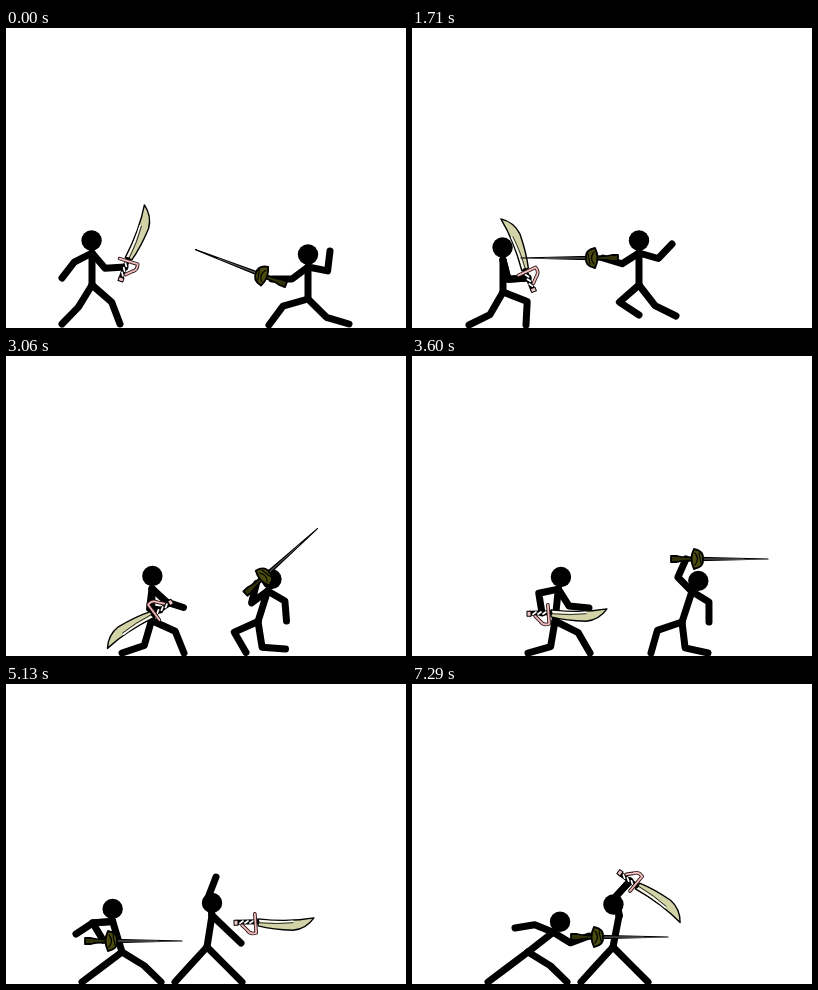
Write an HTML page with a canvas that moves like this. It is 400 px wide and 300 px high and loops after 8000 ms.

```html
<!DOCTYPE html>
<html lang="en">
<head>
<meta charset="utf-8">
<title>Stick figure duel</title>
<style>
  html, body { margin: 0; height: 100%; overflow: hidden; background: #fff; }
  canvas { display: block; }
</style>
</head>
<body>
<canvas id="stage" width="400" height="300"></canvas>
<script>
const ctx = document.getElementById('stage').getContext('2d');
const LOOP = 8000, STEP = 90;
const TORSO = 32, NECK = 12.5, ARM = 20, THIGH = 26, SHIN = 23.5;

// A pose keeps whatever it does not change from the one before.
// spine: torso and head angle; arms: hand x, y and elbow side, sword hand first;
// fly: distance of the sword from its hand; leap, toss: height of the arc on the way here.
const chain = poses => poses.reduce((all, pose) =>
  [...all, { fly: [0, 0], flip: 1, ...all.at(-1), leap: 0, toss: 0, ...pose }], []);

const fencer = chain([
  { at: 0, face: 1, hip: [86, 257], spine: [-90, -92], sword: -70,
    arms: [[119, 239, 1], [56, 250, 1]], feet: [[56, 296], [114, 296]] },
  { at: 4, hip: [87, 259] },
  { at: 14 },
  { at: 19, hip: [91, 264], sword: -112,
    arms: [[116, 250, 1], [116, 250, 1]], feet: [[57, 297], [114, 297]] },
  { at: 28, hip: [148, 264], spine: [-94, -99], sword: -66,
    arms: [[178, 251, 0], [178, 251, 0]], feet: [[116, 297], [178, 297]] },
  { at: 40, hip: [143, 265], spine: [-84, -78], sword: -361,
    arms: [[130, 257, 1], [177, 252, 1]] },
  { at: 49, face: 0, hip: [201, 263], spine: [-92, -94], sword: -329,
    arms: [[177, 261, 1], [232, 251, 0]], feet: [[169, 298], [236, 298]] },
  { at: 57, spine: [-81, -90], sword: -361, fly: [33, 45],
    arms: [[210, 193, -1], [235, 259, 0]] },
  { at: 67, spine: [-79, -117], sword: -683, fly: [0, 0], flip: -1, toss: 25,
    arms: [[218, 197, -1], [218, 197, -1]] }
]);

const rival = chain([
  { at: 0, face: -1, hip: [302, 271], spine: [-90, -90], sword: 201,
    arms: [[266, 251, -1], [324, 223, 1]], feet: [[263, 297], [343, 296]] },
  { at: 4, hip: [301, 273] },
  { at: 14 },
  { at: 19, hip: [227, 257], sword: 180,
    arms: [[191, 230, -1], [260, 216, 1]], feet: [[227, 287], [264, 288]] },
  { at: 28, hip: [234, 265], spine: [-73, -85], sword: 276,
    arms: [[227, 252, -1], [264, 264, -1]], feet: [[241, 296], [263, 289]] },
  { at: 40, hip: [270, 266], spine: [-72, -59], sword: 360,
    arms: [[274, 203, -1], [297, 266, -1]], feet: [[239, 297], [296, 297]] },
  { at: 49, face: 1, leap: 80, hip: [122, 265], spine: [-87, -65], sword: 17, fly: [-2, -41],
    arms: [[93, 214, -1], [165, 236, 1]], feet: [[85, 298], [155, 298]] },
  { at: 57, hip: [116, 268], spine: [-107, -90], sword: 0, fly: [-3, 1], toss: 110,
    arms: [[97, 256, 1], [70, 250, 1]], feet: [[76, 298], [155, 298]] },
  { at: 67, spine: [-38, -57], arms: [[177, 252, 1], [103, 244, 1]] }
]);

const rad = deg => deg * Math.PI / 180;

// Blends numbers, arrays and objects alike.
function mix(a, b, k) {
  if (typeof a === 'number') return a + (b - a) * k;
  if (Array.isArray(a)) return a.map((v, i) => mix(v, b[i], k));
  return Object.fromEntries(Object.keys(a).map(key => [key, mix(a[key], b[key], k)]));
}

function poseAt(poses, tick) {
  const last = poses.at(-1);
  if (tick >= last.at) return { ...last, leap: 0, toss: 0 };
  const i = poses.findIndex(p => p.at > tick);
  const a = poses[i - 1], b = poses[i];
  const k = (tick - a.at) / (b.at - a.at), arc = Math.sin(Math.PI * k);
  return { ...mix(a, b, k), leap: b.leap * arc, toss: b.toss * arc };
}

const reach = ([x, y], angle, len) => [x + len * Math.cos(angle), y + len * Math.sin(angle)];

function polyline(...pts) {
  ctx.beginPath();
  pts.forEach(p => ctx.lineTo(...p));
  ctx.stroke();
}

// Two bones from root to end; side tells which way the joint bends.
function limb(root, end, l1, l2, side) {
  const dx = end[0] - root[0], dy = end[1] - root[1];
  const d = Math.min(Math.hypot(dx, dy), l1 + l2);
  const bend = Math.acos(Math.min(1, (l1 * l1 + d * d - l2 * l2) / (2 * l1 * d)));
  polyline(root, reach(root, Math.atan2(dy, dx) + bend * side, l1), end);
}

function drawBody({ hip, spine, arms, feet, face, leap }, nod = 0) {
  const neck = reach(hip, rad(spine[0]), TORSO);
  ctx.save();
  ctx.translate(0, -leap);
  ctx.strokeStyle = ctx.fillStyle = '#000';
  ctx.lineWidth = 7;
  polyline(hip, neck);
  for (const [x, y, side] of arms) limb(neck, [x, y], ARM, ARM, side);
  for (const foot of feet) limb(hip, foot, THIGH, SHIN, -face);
  ctx.beginPath();
  ctx.arc(...reach(neck, rad(spine[1] + nod), NECK), 10.2, 0, 7);
  ctx.fill();
  ctx.restore();
}

function drawSword({ arms: [[x, y]], fly, sword, flip, leap, toss }, paint) {
  ctx.save();
  ctx.translate(x + fly[0], y + fly[1] - leap - toss);
  ctx.rotate(rad(sword));
  ctx.scale(1, flip);
  paint();
  ctx.restore();
}

function shape(path, fill, stroke, width = 1) {
  const p = new Path2D(path);
  if (fill) { ctx.fillStyle = fill; ctx.fill(p); }
  if (stroke) { ctx.strokeStyle = stroke; ctx.lineWidth = width; ctx.stroke(p); }
}

function cutlass() {
  shape('M9-3Q40 1 65-3Q57 8 44 9Q24 8 9 4Z', '#d3d3a8', '#000', 1.4);
  shape('M10-1Q28 1 44 0', null, '#fff', 1.5);
  shape('M10 1Q28 3 44 1.5', null, '#222', .9);
  shape('M-12 0H8', null, '#000', 5);
  shape('M-9 1l3-2M-4 1l3-2M1 1l3-2', null, '#fff', 1.8);
  shape('M-15-2H-11V3H-15Z', '#efc4c4', '#000');
  const bow = 'M6-8L7 11Q1 13-2 8L-7 3';
  shape(bow, null, '#2a1414', 3.6);
  shape(bow, null, '#efbcbc', 1.8);
}

function rapier() {
  shape('M12-1.6L82 0L12 1.6Z', '#222', '#000', 1.2);
  shape('M17 0H58', null, '#777', .7);
  shape('M-15-3L-9-3Q-2-1 8-2V2Q-2 1-9 3L-15 3Z', '#34340c', '#000', 1.8);
  shape('M8-10Q18-8 17 0Q18 8 8 10Q3 0 8-10Z', '#4c4c0e', '#000', 1.8);
  shape('M9-6Q14 0 9 6M13-6L15 4', null, '#000', 1.2);
}

function frame(now) {
  const tick = Math.floor(now % LOOP / STEP);
  const nod = -34 * Math.max(0, 1 - Math.abs(tick - 79) / 2);
  const a = poseAt(fencer, tick), b = poseAt(rival, tick);
  ctx.fillStyle = '#fff';
  ctx.fillRect(0, 0, 400, 300);
  ctx.lineCap = ctx.lineJoin = 'round';
  drawBody(a, nod);
  drawBody(b);
  drawSword(a, cutlass);
  drawSword(b, rapier);
}

const start = performance.now();
function loop() {
  frame(performance.now() - start);
  requestAnimationFrame(loop);
}
loop();
</script>
</body>
</html>
```
